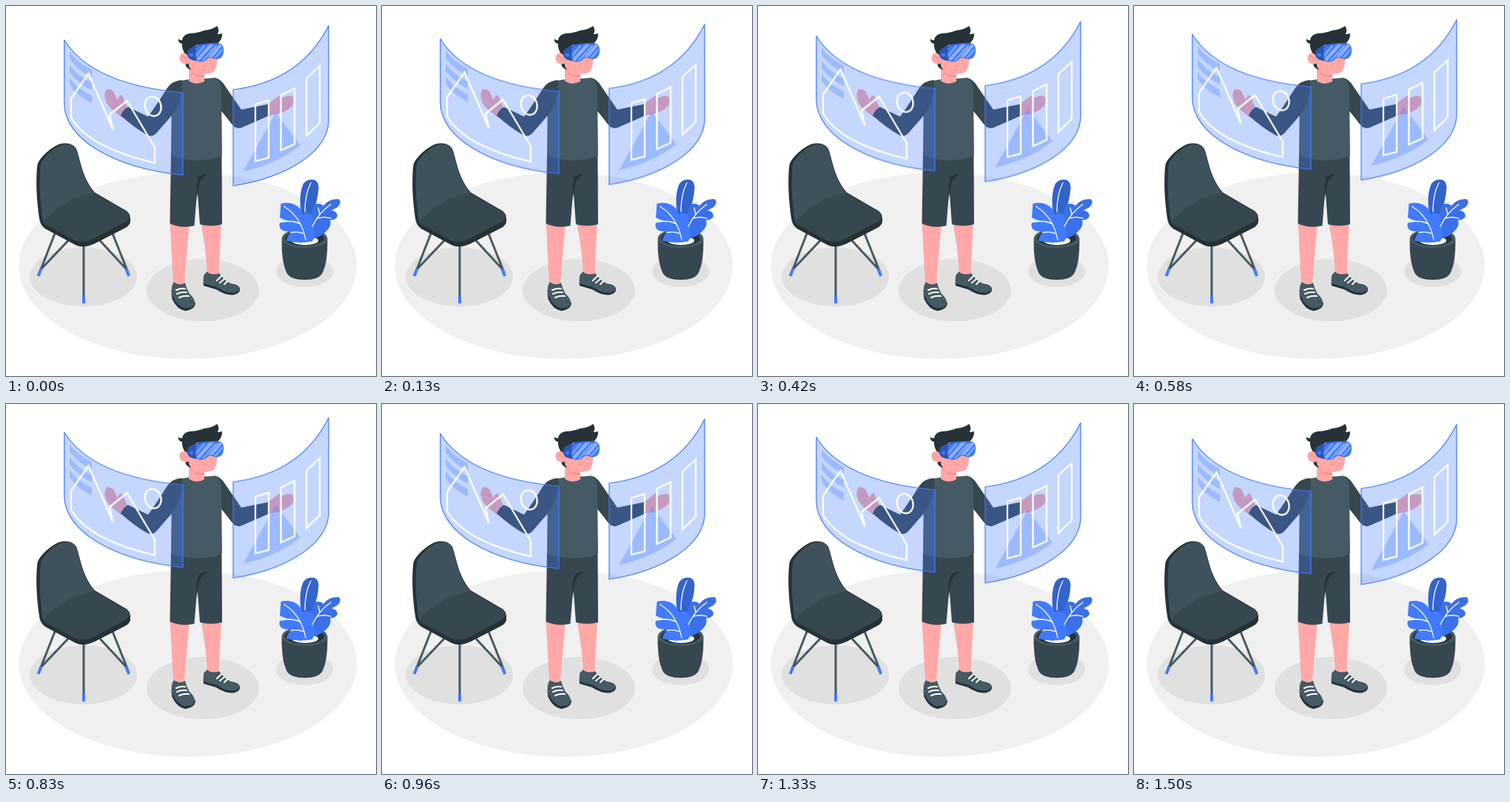
These frames come from a looping animation (500 px wide and 500 px high, 1540 ms). An HTML page:

```html
<!DOCTYPE html>
<html lang="en">
<head>
<meta charset="utf-8">
<title>Floating screens</title>
<style>
  html, body { margin: 0; width: 100%; height: 100%; overflow: hidden; background: #fff; }
  svg { display: block; width: 100vw; height: 100vh; }
  .ink { fill: #263238; }
  .dark { fill: #37474f; }
  .slate { fill: #455a64; }
  .skin { fill: #ffa8a7; }
  .blue { fill: #407bff; }
  .line { fill: none; stroke-linecap: round; stroke-linejoin: round; }
  .glass { fill: #407bff; fill-opacity: .3; stroke: #407bff; stroke-width: 1.2; stroke-linejoin: round; }
  .tint { fill: #407bff; fill-opacity: .3; }
  .chalk { stroke: #fff; stroke-width: 2.3; stroke-linejoin: miter; }
</style>
</head>
<body>
<svg viewBox="0 0 500 500">
  <defs>
    <clipPath id="lens"><path id="lensShape" d="M260 53Q275 50 288 51Q294 52 293.500 61Q293 70 287 71Q281 72 278 69.500Q275 68 272.500 71Q269 75 262 75Q256 75 256 65Q256 54 260 53Z"/></clipPath>
  </defs>

  <g id="floor">
    <ellipse cx="245.700" cy="351" rx="228.300" ry="126" fill="#f0f0f0"/>
    <g fill="#e0e0e0">
      <ellipse cx="104.500" cy="366" rx="72.500" ry="40"/>
      <ellipse cx="266" cy="384" rx="76" ry="42"/>
      <ellipse cx="403.500" cy="358.500" rx="38.500" ry="21.500"/>
    </g>
  </g>

  <g id="chair">
    <path class="line" stroke="#455a64" stroke-width="3" d="M67 305L47 356L85 316M143 305L165 360M126 316L163 356M105 320V394"/>
    <path class="line" stroke="#407bff" stroke-width="4" style="stroke-linecap:butt" d="M47.500 355L43.500 365M162 355L166.300 365M105 392V402"/>
    <path class="ink" d="M42.500 214C46 204 59 193 70 187.500C82 183 92 187 95.500 194C100 206 103 233 120 252L163 277Q168 281 168 287V292Q167 297 160 300.500L119 321.500Q105 328 94 323L53 301Q46 296 45 287C41 260 40 234 42.500 214Z"/>
    <path class="slate" d="M47 213C52 203 63 193 72 189C83 184 92 188 95 194C99 206 102 233 119 252L121 257L62 290L50 291C45 262 45 230 47 213Z" opacity=".8"/>
    <path class="dark" d="M50 291C66 274 88 258 119 253L163 278Q171 284 163 291L117 315.500Q105 321 94 317L56 297Q51 295 50 291Z"/>
  </g>

  <g id="plant">
    <path class="dark" d="M372.700 314Q372 345 379 360Q383 370 404 370Q424 370 428 360Q435 345 434.300 314Z"/>
    <ellipse class="slate" cx="403.500" cy="314" rx="30.800" ry="13"/>
    <ellipse class="ink" cx="403.500" cy="314" rx="26.500" ry="10"/>
    <ellipse fill="#fff" cx="404" cy="317" rx="18" ry="6"/>
    <path fill="#3263ce" d="M399 281C396 262 398 248 402 240Q408 233 417 235Q424 238 422 250C421 265 415 278 411 286Z"/>
    <path fill="#3a70e8" d="M408 316C408 292 413 279 417 268Q424 265 429 270Q436 260 450 261Q454 266 448 272L440 276Q448 278 448 284Q445 290 438 289Q440 296 435 302Q428 311 414 315Z"/>
    <path class="blue" d="M371.500 267Q384 264 393 270Q399 274 401 282Q408 277 413 282Q417 288 415 296Q420 307 414 318Q395 322 379 317Q380 309 388 304Q380 306 373 303Q368 299 370 293L386 291Q377 290 370 286Z"/>
    <path class="line" stroke="#fff" stroke-width="1.300" d="M412 239Q404 254 404 278M376 271Q399 285 405 316M382 291Q393 291 398 295M385 306Q396 304 403 308M439 268Q422 280 414 298M424 282L422 273M420 287Q431 284 439 287"/>
  </g>

  <g id="person">
    <path class="skin" d="M221.500 290L226 374Q233 381 241 374Q244 335 248.500 290ZM262.500 290Q269 318 272 360Q280 367 287.500 360L291 290Z"/>
    <path class="ink" d="M225 376Q222.500 386 224.500 396Q231 410 242 412Q256 410 256 401Z"/>
    <path class="slate" d="M226.500 373Q223 382 224.500 391Q231 406 242 408.500Q255 408 255.500 401Q254 394 248 389Q244 382 242 374Q234 379 226.500 373Z"/>
    <path class="ink" d="M268 362Q266 371 267 378L284 383Q296 391 307 390.500Q317 389 316 381Z"/>
    <path class="slate" d="M271 359Q266 367 267.500 375L285 380Q297 388 307 387.500Q316 386 315.500 380Q313 376 304 375Q295 371 288 361Q279 365 271 359Z"/>
    <path class="line" stroke="#fff" stroke-width="2" d="M230 384Q236 381 242 382M231 389Q237 386 244 387M234 394Q240 391 247 392M285 371L291 365M289 374L295 369M295 376L299 372"/>
    <path class="dark" d="M223 200L221.500 294Q237 301 254.500 297L258.500 248L262 295Q277 299 292 295L291.500 200Z"/>
    <path class="ink" d="M274 225Q266 227 260.500 231Q257 240 257.500 262L260 246Q261 238 264 234Q269 230 274 225Z"/>

    <path class="skin" d="M166 139Q161 133 158.500 124Q157 120 154.500 121Q150 125 151 128Q149 122 145 115Q140 111 136 113Q132 117 134 125Q136 135 146 142L156 150ZM353 133Q361 127 368 122Q372 119 371 125Q380 120 387 122Q390 128 387 135Q379 143 367 146L354 148Z"/>
    <path class="dark" d="M282 97Q290 98 296 108L318 140L355 132.500Q353 140 357 147.500L318 164.500Q312 167 307 162L288 138Z"/>
    <path class="slate" d="M235 101L248 99L270 98L282 97Q290 99 291 112L292 202Q276 209 257 208.500Q237 208 223 202L224 120Q225 105 235 101Z"/>
    <path class="dark" d="M237 100Q224 101 217 112Q204 133 192 149.500L165 136.500Q158 140 155 148Q174 165 191 174.500Q198 178 204 171L224 148Q236 131 238.500 112Q239 104 237 100Z"/>

    <path class="skin" d="M247 80V101Q256 108 268 102L268 88Z"/>
    <path fill="#f28f8f" d="M249 87Q257 95 268 93V96Q255 97 249 87Z"/>
    <path class="ink" d="M243 67Q237 57 238 51Q232 50 233 44Q235 47 238 46Q239 39 248 37Q258 37 268 33Q279 32 285 27Q289 31 286 38Q289 38 292 37Q293 46 284 52L258 60L250 86Q243 85 242 77Z"/>
    <path class="skin" d="M250 61Q246 72 247 81Q251 91 267 92Q276 92 281 89Q286 82 286 64L284 53L258 52Z"/>
    <path class="skin" d="M247 68Q241 60 235.500 66Q232 73 238 77Q243 80 248 77Z"/>
    <path class="line" stroke="#e98686" stroke-width="1" d="M238 68Q242 68 244 73M266 82Q268 80 270 82M275 71L278 75"/>
    <path fill="#2b56b4" d="M247 58L260 53L263 74Q255 75 249 72Q244 69 245 62Z"/>
    <use href="#lensShape" class="blue"/>
    <g clip-path="url(#lens)" class="line" stroke="#8cb0ff">
      <path stroke-width="4.500" d="M258 74L278 52M272 74L290 53"/>
      <path stroke-width="2" d="M264 76L284 54M280 73L296 55M256 68L268 54"/>
    </g>
    <use href="#lensShape" class="line" stroke="#3468da" stroke-width="1"/>
    <path fill="#3468da" d="M250 56Q265 49 285 50L289 51Q273 51 259 55Z"/>
    <circle cx="250.500" cy="66" r="2.500" fill="#407bff"/>
  </g>

  <g id="screens">
    <path class="glass" d="M78.800 46C106 90 165 110.500 239 117V228.500C144 219 79 179 78.800 132Z"/>
    <g id="stripes" class="tint"></g>
    <path class="line chalk" d="M88 125L111.500 91L144.500 167L140 147L163.500 128L201 191V212Q160 203 127 186Q98 169 88 151Z"/>
    <ellipse class="line chalk" cx="198.700" cy="135.600" rx="10.800" ry="13.300" transform="rotate(-15 198.700 135.600)"/>

    <path class="glass" d="M307 113C365 106 410 78 436 26.500V156C434 196 383 231 307 243Z"/>
    <path class="tint" d="M364.500 144L398 188.500Q365 214 320.500 223.500Z"/>
    <g id="bars" class="line chalk"></g>
  </g>
</svg>
<script>
  const $ = id => document.getElementById(id);
  const paths = list => list.map(d => `<path d="${d}"/>`).join('');

  $('stripes').innerHTML = paths([0, 17.5, 35].map(y =>
    `M86 ${62 + y}Q97 ${77 + y} 116 ${86 + y}v10.500Q97 ${87 + y} 86 ${72 + y}Z`));

  // x, width, top left, top right, bottom right, bottom left
  const bars = [
    [337, 18, 133, 127.5, 205, 209.5],
    [371.5, 18.5, 120.5, 111.5, 186.5, 195],
    [406, 18, 97.5, 81, 158, 175.5]
  ];
  $('bars').innerHTML = paths(bars.map(([x, w, a, b, c, d]) =>
    `M${x} ${a}L${x + w} ${b}V${c}L${x} ${d}Z`));

  // Linear rise and fall, held at 24 steps a second.
  const LOOP = 1540, STEPS = 37, TOP = 17, RISE = 10 / 18;
  const frames = Array.from({ length: STEPS }, (_, k) => ({
    offset: Math.round(k * 100 / 24) * 10 / LOOP,
    transform: `translateY(${RISE * (Math.abs(k - TOP) - TOP)}px)`,
    easing: 'steps(1, end)'
  }));
  frames.push({ ...frames[STEPS - 1], offset: 1 });
  $('screens').animate(frames, { duration: LOOP, iterations: Infinity });
</script>
</body>
</html>
```
